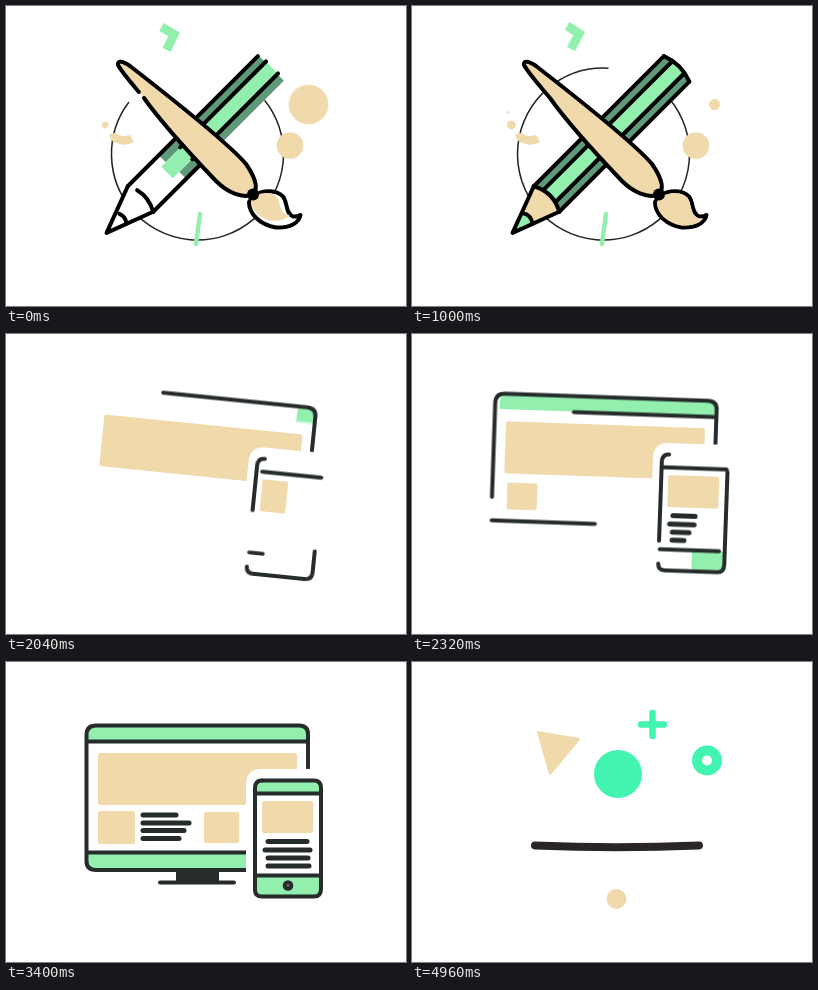
Recreate the animation shown at these times as an HTML page without scripts. Size 400 by 300 pixels, loop 5 s.

```html
<!DOCTYPE html>
<html lang="en">
<head>
<meta charset="utf-8">
<title>Design tools loop</title>
<style>
html, body { margin: 0; width: 100%; height: 100%; overflow: hidden; background: #fff; }
svg { display: block; width: 100vw; height: 100vh; }
:root { --tan: #f0d9ab; --mint: #93efae; --ink: #262b2b; --lime: #43f4b0; }

.tan { fill: var(--tan); }
.mint { fill: var(--mint); }
.lime { fill: var(--lime); }
.ink { fill: var(--ink); }
.line { fill: none; stroke-linecap: round; stroke-linejoin: round; }
.band { fill: none; }
.trace, .draw, .slow, #ring { stroke-dasharray: 1 2; }
#scene-a .line { stroke: #000; stroke-width: 4; }
#scene-b .line { stroke: var(--ink); stroke-width: 4; }
#scene-b .text { stroke-width: 5; }

/* Every cycle lasts 5 s, so 1% is 50 ms. */
svg * { animation-duration: 5s; animation-iteration-count: infinite; animation-timing-function: linear; animation-fill-mode: both; }

#scene-a { animation-name: show-a; }
#scene-b { animation-name: show-b; }
#scene-c { animation-name: show-c; }
#scene-a, #scene-b, #scene-c { animation-timing-function: step-end; }
@keyframes show-a { 0% { visibility: visible; } 30.3%, 100% { visibility: hidden; } }
@keyframes show-b { 0% { visibility: hidden; } 30.3% { visibility: visible; } 79.9%, 100% { visibility: hidden; } }
@keyframes show-c { 0% { visibility: hidden; } 79.9%, 100% { visibility: visible; } }

/* Pencil and brush */
.trace { animation-name: trace; }
@keyframes trace { 0% { stroke-dashoffset: var(--left); } 10%, 100% { stroke-dashoffset: 0; } }
#ring { animation-name: ring; }
@keyframes ring { 0% { stroke-dashoffset: .286; } 20% { stroke-dashoffset: .13; } 26%, 100% { stroke-dashoffset: 0; } }
.resize { transform-box: fill-box; transform-origin: var(--origin, center); animation-name: resize; }
@keyframes resize { 0% { transform: scale(var(--from)); } 11%, 100% { transform: scale(1); } }
#hook { transform-box: fill-box; transform-origin: center; animation-name: hook; }
@keyframes hook { 0% { transform: none; } 20%, 100% { transform: translate(-1px, -1px) rotate(3deg); } }

/* Devices: delays set the start, then parts reset while hidden */
.draw { animation-name: draw; animation-delay: var(--at); }
.slow { animation-name: slow; animation-delay: var(--at); }
@keyframes draw { 0% { stroke-dashoffset: 1.02; } 8%, 60% { stroke-dashoffset: 0; } 60.1%, 100% { stroke-dashoffset: 1.02; } }
@keyframes slow { 0% { stroke-dashoffset: 1.02; } 19%, 60% { stroke-dashoffset: 0; } 60.1%, 100% { stroke-dashoffset: 1.02; } }
.wipe, .pop { transform-box: fill-box; animation-delay: var(--at); }
.wipe { transform-origin: var(--side, left); animation-name: wipe; }
.pop { transform-origin: center; animation-name: pop; }
@keyframes wipe {
  0% { transform: scaleX(0); animation-timing-function: ease-in-out; }
  8%, 60% { transform: scaleX(1); }
  60.1%, 100% { transform: scaleX(0); }
}
@keyframes pop {
  0% { transform: scale(0); animation-timing-function: ease-out; }
  8%, 60% { transform: scale(1); }
  60.1%, 100% { transform: scale(0); }
}
#devices { transform-origin: 200px 150px; animation-name: settle; }
@keyframes settle {
  0%, 30.4% { transform: rotate(13.5deg); }
  33.6% { transform: rotate(11.4deg); }
  41.6% { transform: rotate(5.2deg); }
  46.4% { transform: rotate(2deg); }
  52.8% { transform: rotate(.7deg); }
  63.2%, 100% { transform: rotate(0); }
}
#phone { transform-origin: 282px 265px; animation-name: stretch; }
@keyframes stretch { 0%, 33.6% { transform: scaleY(.84); } 41%, 100% { transform: none; } }

/* Bouncing shapes */
#triangle { animation-name: triangle; animation-timing-function: ease-in-out; }
@keyframes triangle {
  0%, 80%, 99.2%, 100% { d: path("M167 77 L126 70 L138 112 Z"); }
  86.4% { d: path("M161 67 L116 97 L143 143 Z"); }
}
#cross { transform-origin: 240.5px 62.5px; animation-name: spin; }
@keyframes spin { 0%, 80% { transform: none; } 86.4% { transform: rotate(35deg); } 99.2%, 100% { transform: rotate(90deg); } }
#disc { animation-name: disc; }
@keyframes disc { 0%, 80% { r: 15px; } 86.4%, 90.8% { r: 19.7px; } 99.2%, 100% { r: 15px; } }
#hole { animation-name: hole; }
@keyframes hole { 0%, 80% { r: 5px; } 85%, 93% { r: 0; } 99.2%, 100% { r: 5px; } }
#pearl { animation-name: sway; }
@keyframes sway {
  0%, 80% { transform: none; animation-timing-function: ease-out; }
  84.8% { transform: translateX(-57px); animation-timing-function: ease-in-out; }
  94.4% { transform: translateX(57px); animation-timing-function: ease-in; }
  99.2%, 100% { transform: none; }
}
/* Parabolic rise and fall: 60 px high, one bounce each 480 ms */
#ball { animation-name: bounce; }
@keyframes bounce {
  0%, 80% { transform: translateY(112px); animation-timing-function: cubic-bezier(.33, .67, .67, 1); }
  82.5% { transform: translateY(96px); animation-timing-function: cubic-bezier(.33, 0, .67, .33); }
  87.3% { transform: translateY(156px); animation-timing-function: cubic-bezier(.33, .67, .67, 1); }
  92.1% { transform: translateY(96px); animation-timing-function: cubic-bezier(.33, 0, .67, .33); }
  96.9% { transform: translateY(156px); animation-timing-function: cubic-bezier(.33, .67, .67, 1); }
  99.2%, 100% { transform: translateY(112px); }
}
#beam { animation-name: twang; }
@keyframes twang {
  0%, 80%, 99.2%, 100% { d: path("M123 183.5 Q205 187 287 183.5"); }
  82.4%, 87%, 91.2%, 96.6% { d: path("M123 183.5 Q205 183.5 287 183.5"); }
  87.8%, 97.4% { d: path("M123 183.5 Q205 194 287 183.5"); }
  88.8%, 98.3% { d: path("M123 183.5 Q205 179 287 183.5"); }
  89.7% { d: path("M123 183.5 Q205 187 287 183.5"); }
}
</style>
</head>
<body>
<svg viewBox="0 0 400 300" xmlns="http://www.w3.org/2000/svg">
  <g id="scene-a">
    <circle id="ring" cx="191.5" cy="148" r="86" pathLength="1" transform="rotate(-40 191.5 148)" fill="none" stroke="#222" stroke-width="1.5"/>
    <path id="hook" fill="none" stroke="#93efae" stroke-width="9" d="M155.5 21 L168 28.3 L160.7 44"/>
    <circle class="tan resize" style="--from:3.6" cx="302.5" cy="98.5" r="5.5"/>
    <circle class="tan" cx="284" cy="139.5" r="13.3"/>
    <circle class="tan resize" style="--from:.75" cx="99.3" cy="119" r="4.4"/>
    <circle class="tan resize" style="--from:0" cx="96.3" cy="106.5" r="1.3"/>
    <path class="tan" d="M103 129 Q108 125 113 129 Q118 131 124 129 L128 136 Q119 141 111 137 Q105 136 103 129 Z"/>
    <path d="M194 208 L190 238" fill="none" stroke="#93efae" stroke-width="4.5" stroke-linecap="round"/>

    <g transform="translate(134.5 193) rotate(-45)">
      <path fill="#fff" d="M-48 0 L0 -18 H184 V18 H0 Z"/>
      <path class="tan resize" style="--from:0" d="M-48 0 L0 -18 Q10 0 0 18 Z"/>
      <path class="mint resize" style="--from:0" d="M-48 0 L-27 -7 Q-22 0 -27 7 Z"/>
      <g stroke="#5f9a78" stroke-width="9.5">
        <path class="band trace" style="--left:.225" pathLength="1" d="M185 -13 H3"/>
        <path class="band trace" style="--left:.24" pathLength="1" d="M185 13 H3"/>
      </g>
      <path class="band trace" style="--left:.18" pathLength="1" stroke="#93efae" stroke-width="16" d="M186 0 H5"/>
      <path class="line trace" style="--left:.33" pathLength="1" d="M186 -8.5 H5"/>
      <path class="line trace" style="--left:.33" pathLength="1" d="M186 8.5 H5"/>
      <path class="line" d="M0 -18 H184"/>
      <path class="line trace" style="--left:.6" pathLength="1" d="M0 18 H184"/>
      <path class="line trace" style="--left:1.02" pathLength="1" d="M184 -18 Q191 0 184 18"/>
      <path class="line trace" style="--left:.27" pathLength="1" d="M0 18 Q10 0 0 -18"/>
      <path class="line trace" style="--left:.2" pathLength="1" d="M-27 7 Q-22 0 -27 -7"/>
      <path class="line" d="M0 -18 L-48 0 L0 18"/>
    </g>

    <path class="line trace" style="--left:.02;fill:var(--tan)" pathLength="1" d="M138 92 C155 116 188 152 210 175 C222 187 236 192 245 189 C253 185 251 174 240 158 C224 139 160 88 124 60 C117 55 111 54 112 59 C117 68 128 80 138 92"/>
    <g id="bristles">
      <path class="line" style="fill:#fff" d="M247 190 C258 183 271 184 277 190.5 C282 197 279 207 287 210.5 Q291 211 294.5 209 C293 217 284 222 270 221.5 C254 219 243 208 243 196 Z"/>
      <path class="tan resize" style="--from:.85;--origin:0 0" d="M247 192 C258 185 270 186 275.5 192 C280 198 278 209 287 212.5 L291 212.5 C287 217 281 220 270 219.5 C255 217 245 207 245 196 Z"/>
    </g>
    <circle cx="247" cy="188.5" r="6"/>
  </g>

  <g id="scene-b">
    <g id="devices">
      <path class="mint wipe" style="--at:1.96s;--side:right" d="M302 79 H81 V72 Q81 64 89 64 H293 Q302 64 302 73 Z"/>
      <path class="mint wipe" style="--at:2.36s" d="M81 191 H302 V208 H90 Q81 208 81 199 Z"/>
      <rect class="tan wipe" style="--at:1.62s" x="92" y="91" width="199" height="52" rx="2"/>
      <rect class="tan pop" style="--at:2.07s" x="92" y="149" width="37" height="33" rx="2"/>
      <rect class="tan pop" style="--at:2.36s" x="198" y="150" width="35" height="31" rx="2"/>
      <path class="line text draw" style="--at:2.36s" pathLength="1" d="M137 153 H170"/>
      <path class="line text draw" style="--at:2.42s" pathLength="1" d="M137 161 H183"/>
      <path class="line text draw" style="--at:2.48s" pathLength="1" d="M137 168.5 H178"/>
      <path class="line text draw" style="--at:2.54s" pathLength="1" d="M137 176.5 H173"/>
      <path class="line draw" style="--at:2.06s" pathLength="1" d="M302 79.5 H81"/>
      <path class="line draw" style="--at:2.13s" pathLength="1" d="M81 190.5 H302"/>
      <path class="line slow" style="--at:1.7s" pathLength="1" d="M302 106 V72 Q302 63.5 293 63.5 H90 Q80.5 63.5 80.5 73 V199 Q80.5 208 90 208 H240"/>
      <rect class="ink pop" style="--at:2.48s" x="170" y="208" width="43" height="12"/>
      <path class="line draw" style="--at:2.6s" pathLength="1" d="M154 220.5 H228"/>

      <g id="phone">
        <path fill="#fff" d="M240 245 V123 Q240 107 256 107 H325 V245 Z"/>
        <path class="mint wipe" style="--at:2.36s" d="M250 131 V125 Q250 118 257 118 H308 Q315 118 315 125 V131 Z"/>
        <path class="mint wipe" style="--at:2.12s;--side:right" d="M250 214 H315 V227 Q315 234 308 234 H257 Q250 234 250 227 Z"/>
        <rect class="tan wipe" style="--at:1.84s" x="256" y="139" width="51" height="32" rx="2"/>
        <path class="line text draw" style="--at:2.09s" pathLength="1" d="M262 179.5 H301"/>
        <path class="line text draw" style="--at:2.1s" pathLength="1" d="M259 188 H304"/>
        <path class="line text draw" style="--at:2.15s" pathLength="1" d="M262 196 H302"/>
        <path class="line text draw" style="--at:2.2s" pathLength="1" d="M262 204 H303"/>
        <path class="line draw" style="--at:1.67s" pathLength="1" d="M314 131.5 H250"/>
        <path class="line draw" style="--at:1.95s" pathLength="1" d="M250 213.5 H314"/>
        <path class="line slow" style="--at:1.56s" pathLength="1" d="M256 118.5 Q249 118.5 249 126 V228"/>
        <path class="line slow" style="--at:1.65s" pathLength="1" d="M249 228 Q249 234.5 256 234.5 H308 Q315 234.5 315 227 V126 Q315 118.5 308 118.5 H256"/>
        <g class="pop" style="--at:2.5s">
          <circle class="ink" cx="282" cy="223.5" r="5.3"/>
          <circle cx="282" cy="223.5" r="1.4" fill="#607066"/>
        </g>
      </g>
    </g>
  </g>

  <g id="scene-c">
    <path id="triangle" d="M167 77 L126 70 L138 112 Z" fill="#f0d9ab" stroke="#f0d9ab" stroke-width="2" stroke-linejoin="round"/>
    <path id="cross" d="M229 62.5 H252 M240.5 51 V74" fill="none" stroke="#43f4b0" stroke-width="6.5" stroke-linecap="round"/>
    <circle id="disc" class="lime" cx="295" cy="98.5" r="15"/>
    <circle id="hole" cx="295" cy="98.5" r="5" fill="#fff"/>
    <path id="beam" d="M123 183.5 Q205 183.5 287 183.5" fill="none" stroke="#2a2627" stroke-width="8" stroke-linecap="round"/>
    <circle id="ball" class="lime" cx="206" cy="0" r="24"/>
    <circle id="pearl" class="tan" cx="204.5" cy="237" r="10"/>
  </g>
</svg>
</body>
</html>
```
